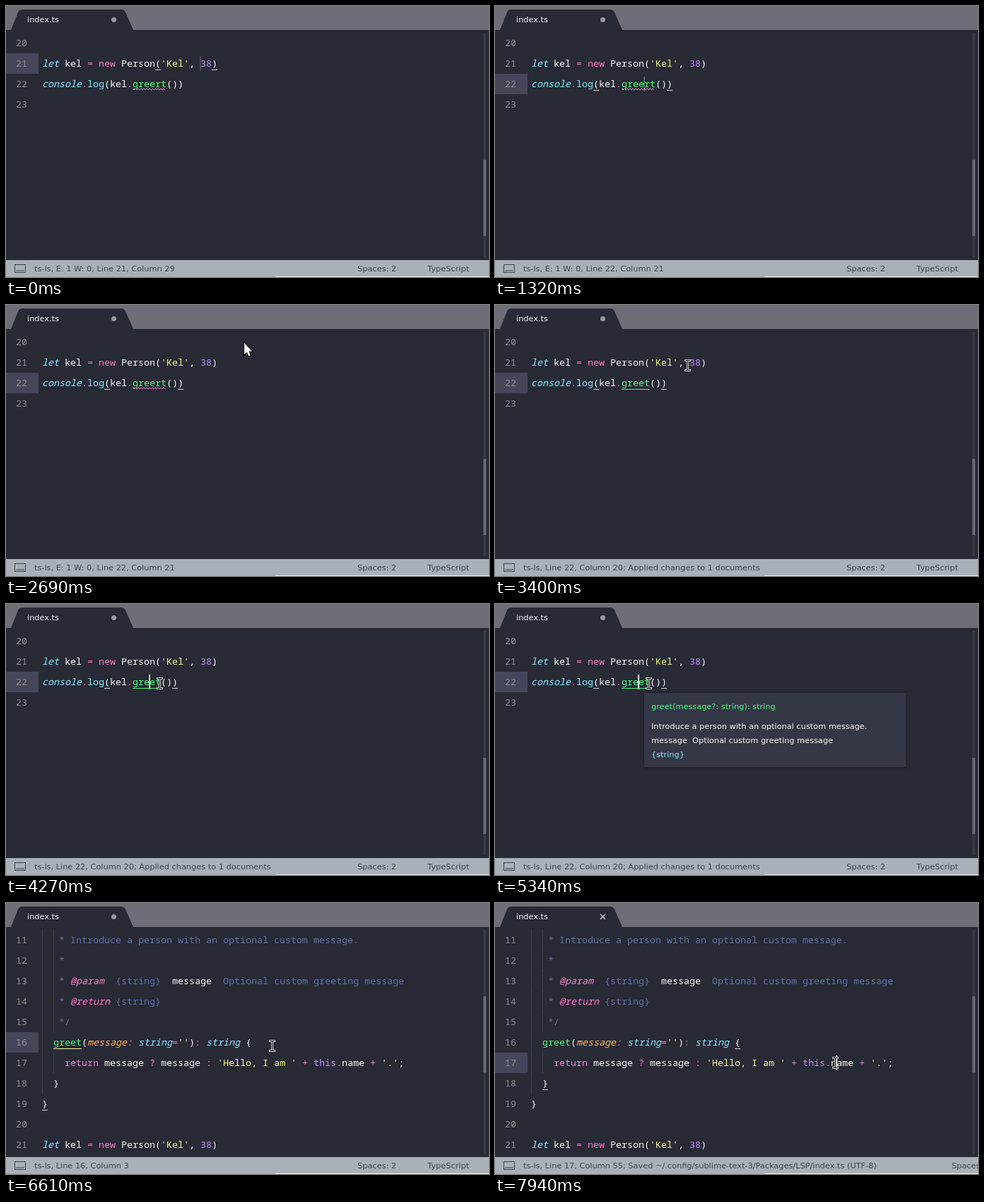
An HTML page with a canvas for the animation above (8000 ms loop, 683 by 384 pixels).

```html
<!DOCTYPE html>
<html lang="en">
<head>
<meta charset="utf-8">
<title>Code editor</title>
<style>
  html, body { margin: 0; height: 100%; overflow: hidden; background: #282a36; }
  canvas { display: block; }
</style>
</head>
<body>
<canvas id="stage" width="683" height="384"></canvas>
<script>
const ctx = document.getElementById('stage').getContext('2d');
const LOOP = 8000, ROW = 29, CHAR = 8, LEFT = 51;
const MONO = '13.333px "Noto Sans Mono", monospace';
const SANS = '11.33px "DejaVu Sans", sans-serif';
const COLORS = {
  w: '#f8f8f2', c: '#8be9fd', p: '#ff79c6', g: '#50fa7b',
  y: '#f1fa8c', v: '#bd93f9', o: '#ffb86c', b: '#6272a4'
};

// Each token starts with its colour letter; a capital means italic.
const CODE = {
  11: 'b   * Introduce a person with an optional custom message.',
  12: 'b   *',
  13: 'b   * |P@param|b  {string}  |wmessage|b  Optional custom greeting message',
  14: 'b   * |P@return|b {string}',
  15: 'b   */',
  16: "w  |ggreet|w(|Omessage|P: |Cstring|p=|y''|w)|p:|w |Cstring|w {",
  17: "w    |preturn|w message |p?|w message |p:|y 'Hello, I am '|p + |vthis|p.|wname|p + |y'.'|w;",
  18: 'w  }',
  19: 'w}',
  20: '',
  21: "Clet|w kel |p=|w |pnew|w Person(|y'Kel'|w, |v38|w)",
  22: '',
  23: ''
};
const callLine = word => `Cconsole|p.|clog|w(kel|p.|g${word}|w())`;

const MENU = ["Change spelling to 'greet'", "Declare method 'greert'",
  "Declare property 'greert'", "Add index signature for property 'greert'"];

// Moments at which the caret moves or restarts its blink: time, line, column.
const CARETS = [[-640, 21, 29], [700, 22, 21], [1810, 22, 21], [2730, 22, 20],
  [3790, 22, 20], [5500, 16, 3], [7900, 17, 55]];

// Pointer path: time, x, y.
const PATH = [[3040, 337, 55], [3400, 272, 85], [3810, 219, 111], [3970, 217, 112],
  [5340, 217, 112], [5820, 323, 87], [6170, 348, 146], [6610, 376, 202],
  [6970, 402, 228], [7300, 442, 260], [7560, 487, 243], [7740, 481, 226]];

const clamp = v => Math.max(0, Math.min(1, v));
const smooth = v => v * v * (3 - 2 * v);
const between = (t, a, b) => t >= a && t < b;
const colX = col => LEFT + col * CHAR;

function rect(x, y, w, h, color) {
  ctx.fillStyle = color;
  ctx.fillRect(x, y, w, h);
}

function text(str, x, y, color, font) {
  ctx.font = font;
  ctx.fillStyle = color;
  ctx.fillText(str, x, y);
}

function polyline(points, color, width) {
  ctx.beginPath();
  points.forEach(([x, y]) => ctx.lineTo(x, y));
  ctx.strokeStyle = color;
  ctx.lineWidth = width;
  ctx.stroke();
}

function codeLine(source, y) {
  let col = 0;
  for (const token of source.split('|')) {
    const style = token[0], str = token.slice(1);
    if (!style) continue;
    const color = style.toLowerCase();
    text(str, colX(col), y, COLORS[color], (style === color ? '' : 'italic ') + MONO);
    col += str.length;
  }
}

function caretAlpha(age) {
  const p = age % 1360;
  if (p < 680) return 1 - clamp((p - 440) / 240);
  return clamp((p - 1120) / 240);
}

function guide(col, y) {
  for (let i = 0; i < ROW; i += 2) rect(colX(col), y + i, 1, 1, '#4b4e60');
}

function drawEditor(t) {
  const scroll = 261 * smooth(clamp((t - 5540) / 495));
  const top = line => Math.round(67 + (line - 21) * ROW + scroll);
  const underline = (line, col, n, color = '#d8d8d0') =>
    rect(colX(col), top(line) + 23, n * CHAR, 1, color);
  const [start, line, column] = CARETS.filter(c => c[0] <= t).pop();
  const word = t < 2730 ? 'greert' : 'greet';

  rect(0, top(line), 46, ROW, '#44475a');
  for (let n = 11; n <= 23; n++) {
    const y = top(n);
    if (y > 360 || y < 0) continue;
    if (n < 19) guide(0, y);
    if (n < 16 || n === 17) guide(2, y);
    text(n, 14, y + 19, '#8f908a', MONO);
    codeLine(n === 22 ? callLine(word) : CODE[n], y + 19);
  }

  if (line === 21) {
    underline(21, 20, 1);
    underline(21, 30, 1);
  } else if (line === 22) {
    underline(22, 11, 1);
    underline(22, 18 + word.length, 1);
  } else if (line === 16) {
    underline(19, 0, 1);
  } else {
    underline(16, 36, 1);
    underline(18, 2, 1);
  }
  if (between(t, 3040, 5500)) underline(22, 16, 5, COLORS.g);
  if (between(t, 6170, 7900)) underline(16, 2, 5, COLORS.y);

  if (t < 3040) {
    const wave = [];
    for (let x = 0; x <= word.length * CHAR - 1; x += 2)
      wave.push([colX(16) + x, top(22) + (x % 4 ? 23 : 21)]);
    polyline(wave, COLORS.p, 1);
  }

  ctx.globalAlpha = caretAlpha(t - start);
  rect(colX(column - 1) - 1, top(line) + 4, 2, 21, COLORS.w);
  ctx.globalAlpha = 1;

  rect(675, 38, 4, 318, '#363842');
  rect(675, 218 - scroll * 0.3295, 4, 108, '#666872');
}

function drawTab(t) {
  rect(0, 0, 683, 34, '#6f6e77');
  ctx.beginPath();
  ctx.moveTo(7, 34);
  ctx.lineTo(17, 9);
  ctx.quadraticCurveTo(18.5, 5, 23, 5);
  ctx.lineTo(163, 5);
  ctx.quadraticCurveTo(167, 5, 169, 9);
  ctx.lineTo(180, 34);
  ctx.fillStyle = '#282a36';
  ctx.fill();
  text('index.ts', 30, 23, '#f4f4f4', SANS);
  if (t < 6900) {
    ctx.beginPath();
    ctx.arc(152.5, 19.5, 3.5, 0, 7);
    ctx.fillStyle = '#98999e';
    ctx.fill();
  } else {
    polyline([[149, 16], [156, 23]], '#c4c5c8', 1.6);
    polyline([[156, 16], [149, 23]], '#c4c5c8', 1.6);
  }
}

function statusText(t) {
  const [, line, column] = CARETS.filter(c => c[0] <= t).pop();
  let note = '';
  if (between(t, 2730, 6590)) note = '; Applied changes to 1 documents';
  if (t >= 6900) note = '; Saved ~/.config/sublime-text-3/Packages/LSP/index.ts (UTF-8)';
  return `ts-ls, ${t < 3040 ? 'E: 1 W: 0, ' : ''}Line ${line}, Column ${column}${note}`;
}

function drawStatus(t) {
  const ink = '#3e4348', status = statusText(t);
  rect(0, 360, 683, 24, '#a9b0b8');
  rect(381, 383, 302, 1, '#eeeeee');
  ctx.strokeStyle = ink;
  ctx.lineWidth = 1;
  ctx.strokeRect(12.5, 366.5, 15, 11);
  rect(14, 374, 12, 2, '#72787e');
  text(status, 40, 376, ink, SANS);
  const x = Math.max(497, 40 + ctx.measureText(status).width + 106);
  text('Spaces: 2', x, 376, ink, SANS);
  text('TypeScript', x + 99, 376, ink, SANS);
}

function panel(x, y, w, h, color) {
  ctx.shadowColor = 'rgba(0,0,0,.35)';
  ctx.shadowBlur = 5;
  rect(x, y, w, h, color);
  ctx.shadowBlur = 0;
}

function drawMenu(t) {
  ctx.globalAlpha = clamp((t - 1760) / 280);
  panel(210, 131, 392, 108, '#eeeeec');
  const selected = t >= 2250;
  if (selected) rect(210, 135, 392, 25, '#4a90d9');
  MENU.forEach((item, i) =>
    text(item, 242, 152 + i * 25, selected && !i ? '#fff' : '#2e3436', MONO));
  ctx.globalAlpha = 1;
}

function drawHover() {
  panel(211, 126, 370, 105, '#343746');
  codeLineAt('greet(message?: string): string', 149, COLORS.g);
  codeLineAt('Introduce a person with an optional custom message.', 177, COLORS.w);
  codeLineAt('message  Optional custom greeting message', 197, COLORS.w);
  codeLineAt('{string}', 217, COLORS.c);
}

function codeLineAt(str, y, color) {
  text(str, 221, y, color, SANS);
}

function pointerAt(t) {
  const next = PATH.findIndex(p => p[0] > t);
  if (next < 0) return PATH[PATH.length - 1].slice(1);
  if (next === 0) return PATH[0].slice(1);
  const [t0, x0, y0] = PATH[next - 1], [t1, x1, y1] = PATH[next];
  const k = (t - t0) / (t1 - t0);
  return [Math.round(x0 + (x1 - x0) * k), Math.round(y0 + (y1 - y0) * k)];
}

function drawArrow(x, y) {
  ctx.beginPath();
  [[0, 0], [0, 16], [3.6, 12.6], [6.2, 18.6], [8.8, 17.4], [6.3, 11.6], [11, 11.4]]
    .forEach(([dx, dy]) => ctx.lineTo(x + dx, y + dy));
  ctx.closePath();
  ctx.strokeStyle = '#111';
  ctx.lineWidth = 2;
  ctx.stroke();
  ctx.fillStyle = '#fff';
  ctx.fill();
}

function drawBeam(x, y) {
  for (const [color, pad] of [['#d0d0d0', 1], ['#16171d', 0]]) {
    rect(x - pad, y - 7 - pad, 1 + 2 * pad, 15 + 2 * pad, color);
    for (const end of [-7, 7])
      rect(x - 3 - pad, y + end - pad, 7 + 2 * pad, 1 + 2 * pad, color);
  }
}

function draw(t) {
  rect(0, 0, 683, 384, '#282a36');
  drawEditor(t);
  drawTab(t);
  drawStatus(t);
  if (between(t, 1760, 2690)) drawMenu(t);
  if (between(t, 4310, 5500)) drawHover();
  if (between(t, 1760, 2730)) drawArrow(337, 54);
  else if (t >= 2730) drawBeam(...pointerAt(t));
}

const begin = performance.now();
function tick() {
  draw((performance.now() - begin) % LOOP);
  requestAnimationFrame(tick);
}
tick();
</script>
</body>
</html>
```
